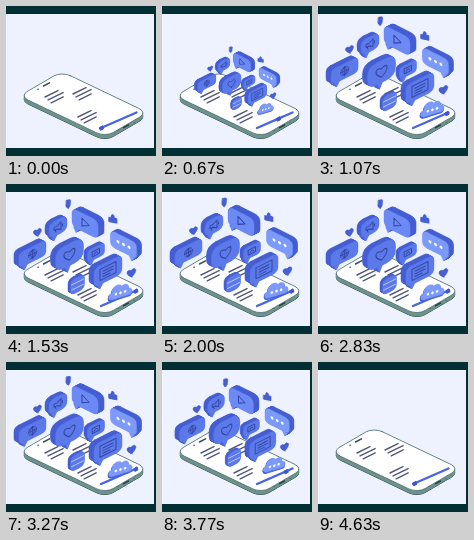
An HTML page for the animation above (4660 ms loop, 150 by 150 pixels).

```html
<!DOCTYPE html>
<html lang="en">
<head>
<meta charset="utf-8">
<title>Social phone</title>
<style>
html, body { margin: 0; width: 100%; height: 100%; overflow: hidden; background: #022f33; }
svg { display: block; width: 100vw; height: 100vh; }
</style>
</head>
<body>
<svg id="stage" viewBox="0 0 150 150" stroke-linecap="round" stroke-linejoin="round">
  <rect width="150" height="150" fill="#022f33"/>
  <rect y="8" width="148" height="134" fill="#eef2ff"/>
  <g id="phone"></g>
  <g id="slider">
    <path d="M95 122L130.5 106.5" stroke="#4865e9" stroke-width="2.4"/>
    <path id="knob" d="M-2 -.4L1 -2.2L2 .8L-.8 2.3Z" fill="#3d55d2" stroke="#3d55d2"/>
  </g>
  <g id="cloudburst"></g>
</svg>
<script>
const LOOP = 4660, IN = 1100, OUT = 3590, OUT_LEN = 1085;
const CX = 82, CY = 94;
const LEFT = '#6c8af5', RIGHT = '#5b79e8', LIGHT = '#7c9afa';
const SIDE = '#465fd3', EDGE = '#4159c8', MARK = '#30429f';
const $ = id => document.getElementById(id);

const path = (d, stroke, width = 1, fill = 'none') =>
  `<path d="${d}" fill="${fill}" stroke="${stroke}" stroke-width="${width}"/>`;
const at = (x, y, body, slope = 0) =>
  `<g transform="matrix(1 ${slope} 0 1 ${x} ${y})">${body}</g>`;

// Phone: a rounded square laid flat, with a thick rim.
const slab = (y, fill, stroke, width) =>
  `<rect width="100" height="100" rx="10" ry="18" fill="${fill}" stroke="${stroke}" stroke-width="${width}"
   vector-effect="non-scaling-stroke" transform="matrix(.86 .41 -.42 .245 55.5 ${y})"/>`;

function textBlock(x, y) {
  let out = '';
  for (let i = 0; i < 3; i++) {
    const len = [13, 15, 12][i];
    out += path(`M${x + i * 3.1} ${y + i * 2.9}l${len} ${-len * .49}`, '#55597c', 1.5);
  }
  return out;
}

function phone() {
  let out = slab(69.5, '#5f827f', '#38565a', 1);
  for (let y = 69; y > 65.5; y -= .5) out += slab(y, '#6f938e', '#6f938e', .6);
  out += slab(65.5, '#ffffff', '#4a6b70', .8);
  out += path('M37.5 80L43.5 76.8', '#354f59', 1.5) + path('M32 83.2h.1', '#354f59', 1.5);
  out += path('M117.5 121.6L122.5 119', '#274348', 1.5) + path('M112 124.6h.1M128 116.6h.1', '#385b5d', 1);
  return out + textBlock(39, 91) + textBlock(67, 88) + textBlock(72, 111);
}

// Rounded card outline centred on the origin; tail is its x position.
function bubble(w, h, tail, round = .3, drop = 4.5) {
  const r = h * round, x = w / 2, y = h / 2;
  const tip = drop ? `H${tail + 3}L${tail} ${y + drop}L${tail - 2.5} ${y}` : '';
  return `M${r - x} ${-y}H${x - r}Q${x} ${-y} ${x} ${r - y}V${y - r}Q${x} ${y} ${x - r} ${y}` +
    `${tip}H${r - x}Q${-x} ${y} ${-x} ${y - r}V${r - y}Q${-x} ${-y} ${r - x} ${-y}Z`;
}

// Stacks copies of a shape to give it depth; dir -1 rises to the right.
function solid(x, y, dir, d, icon, depth = 5, face = dir > 0 ? LEFT : RIGHT) {
  const slope = dir * .5;
  let out = '';
  for (let i = depth; i > 0; i -= .5)
    out += at(x + dir * i, y - i * .5, path(d, i === depth ? EDGE : SIDE, .5, SIDE), slope);
  return out + at(x, y, path(d, face, .4, face) + icon, slope);
}

const heart = s =>
  `M0 ${s}C${-s * 1.6} ${-s * .1} ${-s} ${-s * 1.3} 0 ${-s * .45}C${s} ${-s * 1.3} ${s * 1.6} ${-s * .1} 0 ${s}Z`;
const trio = (gap, r) =>
  [-gap, 0, gap].map(x => `<circle cx="${x}" r="${r}" fill="#fff"/>`).join('');

const globe = path('M-4 0A4 4 0 1 0 4 0A4 4 0 1 0 -4 0H4M0 -4V4M0 -4C-2.6 -2 -2.6 2 0 4C2.6 2 2.6 -2 0 -4', MARK, .7);
const horn = path('M-4 -1.4H-1L3 -3.8V3.8L-1 1.4H-4ZM-2.8 1.4L-2 4M4.6 -1V1', MARK, .9);
const play = path('M-3 -4L4 0L-3 4Z', MARK, 1);
const lines = path('M-8 -5.5H8V5.5H-8Z', MARK, .9) + path('M-5 -2.3H5M-5 .4H5M-5 3H2', MARK, .9);
const photo = path('M-3.5 -2.5H3.5V2.5H-3.5ZM-2 1L0 -1L2 1', MARK, .8);
const bands = path('M-6 -2.6H6M-6 2.6H6', '#b9c8ff', 1);
const cloud = 'M-8 6.5C-13 6.5 -13 0 -8.5 -.3C-9 -6.5 -1.5 -9 1.5 -4.3C5 -7 9 -4 8.2 -.2C13 0 12.5 6.5 8.5 6.5Z';

function icons() {
  const small = (x, y, d, slope = -.4) =>
    at(x - 1, y - .5, path(d, EDGE, .6, EDGE), slope) + at(x, y, path(d, SIDE, .4, SIDE), slope);
  return [
    solid(79, 37.5, 1, bubble(26, 18, -9), play, 6),
    solid(52, 41, -1, bubble(18, 15, -4, .4), horn, 4),
    solid(26.5, 68, -1, bubble(27, 15, -8), globe),
    solid(90, 66.5, -1, bubble(17, 12, -5), photo, 3.5),
    solid(117.5, 58.5, 1, bubble(26, 16, 8), trio(5.5, 1.5), 5, LIGHT),
    solid(63.5, 68.5, -1, bubble(28, 22, -2, .42, 6), path(heart(5.6), MARK, 1)),
    solid(71.5, 98.5, -1, bubble(14, 15, 0, .35, 0), bands, 2.5),
    solid(102, 85, -1, bubble(28, 19, -8), lines),
    at(114, 106, path(cloud, SIDE, 1, SIDE), -.3) + at(114.5, 104.8, path(cloud, LIGHT, .4, LIGHT) + at(0, 2, trio(4.6, 1.3)), -.3),
    small(32, 46.5, heart(3.6)),
    small(126, 87, heart(4)),
    small(63, 18, 'M-1.5 -4L1.8 -3.2L1.2 2.2L-.5 4.5L-2 1.8Z'),
    small(107.5, 33, 'M-3.6 -.5H-2L-.4 -4.2Q1.5 -4 .8 -1H3.6V3.6H-3.6Z', .2)
  ].join('');
}

function draw(t) {
  const easeIn = Math.min(1, t / IN);
  const out = Math.min(1, Math.max(0, (t - OUT) / OUT_LEN));
  const wave = p => (1 - Math.cos(Math.PI * p)) / 2;
  const s = wave(easeIn) * (1 - wave(out));
  const bob = 3 * Math.cos(2 * Math.PI * (t - 1700) / 1300);
  const group = $('cloudburst');
  group.setAttribute('transform', `translate(${CX} ${CY}) scale(${s}) translate(${-CX} ${bob - CY})`);
  group.setAttribute('visibility', s < .015 ? 'hidden' : 'visible');
  const k = easeIn * (1 - out);
  $('knob').setAttribute('transform', `translate(${95.5 + 34.5 * k} ${122 - 15 * k})`);
}

$('phone').innerHTML = phone();
$('cloudburst').innerHTML = icons();
const start = performance.now();
function tick() {
  draw((performance.now() - start) % LOOP);
  requestAnimationFrame(tick);
}
tick();
</script>
</body>
</html>
```
